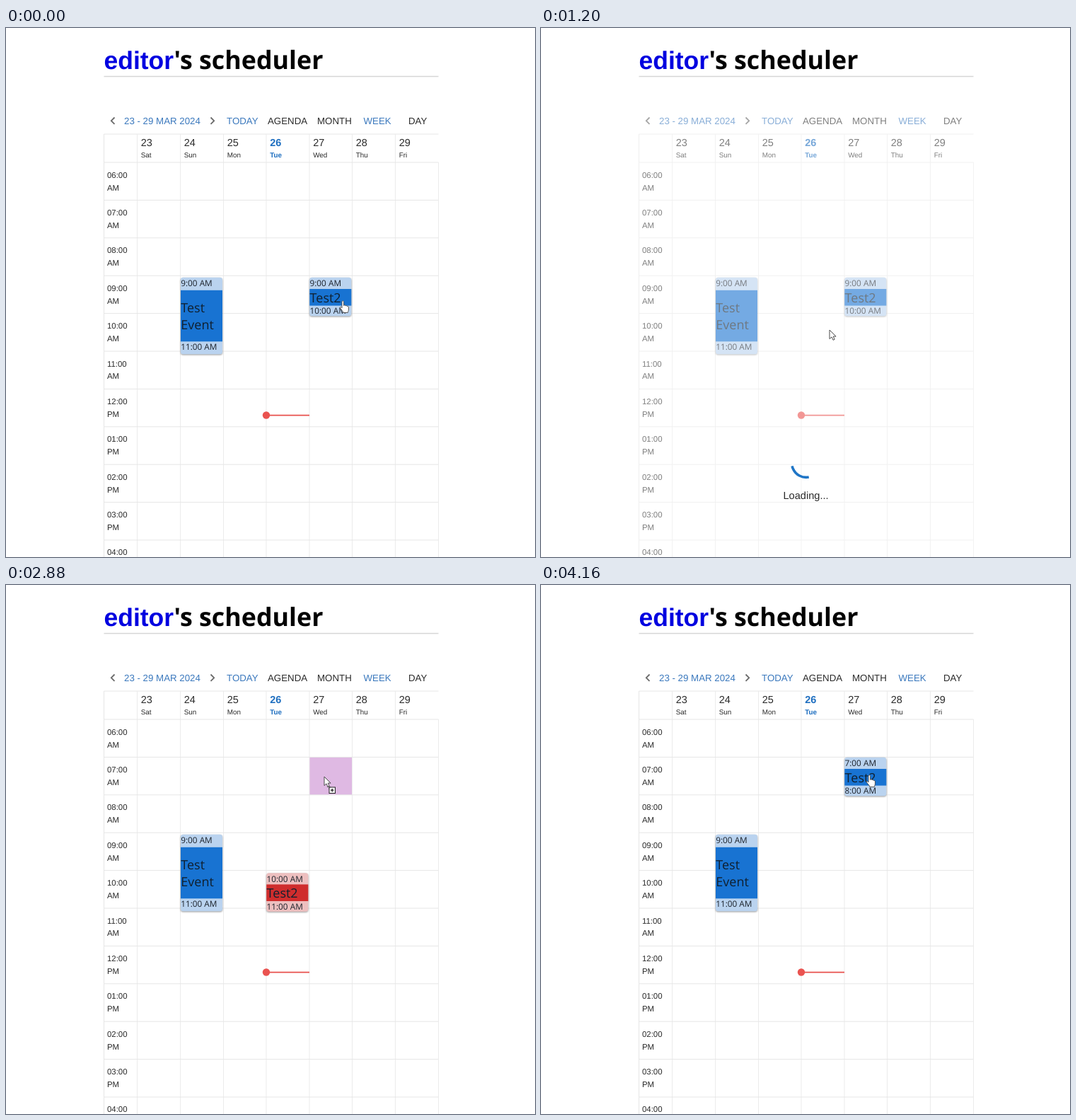
Animation of 748 by 748 pixels, one loop 4.24 s. Source, as an HTML page:

```html
<!DOCTYPE html>
<html lang="en">
<head>
<meta charset="utf-8">
<title>Scheduler</title>
<style>
  html, body { margin: 0; width: 100%; height: 100%; overflow: hidden; background: #fff; }
  svg { display: block; width: 748px; height: 748px; }
  text { font-family: "Liberation Sans", Arial, sans-serif; fill: #2a2a2a; white-space: pre; text-rendering: geometricPrecision; }
  .title { font: bold 35.8px "Open Sans", "Noto Sans", sans-serif; fill: #000; }
  .user { font: bold 35.5px "Liberation Sans", Arial, sans-serif; fill: #0000e0; }
  .tool { font-size: 13.3px; }
  .num { font-size: 14.5px; }
  .day { font-size: 9.9px; }
  .hour { font-size: 11.4px; }
  .blue { fill: #3a78bd; }
  .today { fill: #1f6fc0; font-weight: bold; }
  .time { font: 11.8px "Open Sans", "Noto Sans", sans-serif; fill: #1c222b; }
  .name { font: 18px "Open Sans", "Noto Sans", sans-serif; fill: #10202f; }
  .event { filter: drop-shadow(0 1px 1.2px rgba(0, 0, 0, .4)); }
  .event .edge { fill: #bad3ef; }
  .event .body { fill: #1873d2; }
  .event.drag .edge { fill: #edbfbf; }
  .event.drag .body { fill: #cf2d2d; }
</style>
</head>
<body>
<svg id="stage" viewBox="0 0 748 748"></svg>
<script>
const LOOP = 4240, STEP = 80;
const COLS = [185.5, 246.5, 307.5, 368, 429, 489.5, 550.5, 611.5];
const ROW_TOP = 190, ROW_H = 53.4;
const rowY = i => ROW_TOP + i * ROW_H;

const text = (x, y, cls, s) => `<text x="${x}" y="${y}" class="${cls}">${s}</text>`;
const line = (x1, y1, x2, y2, color = '#e6e6e6', w = 1) =>
  `<path d="M${x1} ${y1}L${x2} ${y2}" stroke="${color}" stroke-width="${w}"/>`;
const rect = (x, y, w, h, attrs) =>
  `<rect x="${x}" y="${y}" width="${w}" height="${h}" ${attrs}/>`;

function toolbar() {
  const items = [[167, '23 - 29 MAR 2024', 1], [312, 'TODAY', 1], [370, 'AGENDA'],
    [440, 'MONTH'], [505.5, 'WEEK', 1], [569, 'DAY']];
  const chevron = d => `<path d="${d}" fill="none" stroke="#6a6a6a" stroke-width="1.8"/>`;
  return chevron('M153.500 126.500l-4.700 4.700l4.700 4.700') + chevron('M289.500 126.500l4.700 4.700l-4.700 4.700') +
    items.map(([x, s, on]) => text(x, 135.7, on ? 'tool blue' : 'tool', s)).join('');
}

function grid() {
  let out = line(138.5, 150, 611.5, 150) + line(138.5, 150, 138.5, 748);
  COLS.forEach((x, i) => out += line(x, i === 7 ? 190 : 150, x, 748, '#ebebeb'));
  for (let i = 0; i < 11; i++) out += line(138.5, rowY(i), 611.5, rowY(i));
  return out;
}

function labels() {
  let out = '';
  ['Sat', 'Sun', 'Mon', 'Tue', 'Wed', 'Thu', 'Fri'].forEach((d, i) => {
    const cls = i === 3 ? ' today' : '', x = COLS[i] + 5.2;
    out += text(x, 167.3, 'num' + cls, 23 + i) + text(x, 183.3, 'day' + cls, d);
  });
  for (let i = 0; i < 11; i++) {
    const h = String((i + 5) % 12 + 1).padStart(2, '0');
    const y = 211.7 + i * 53.37;
    out += text(143, y, 'hour', h + ':00') + text(143, y + 17.9, 'hour', i < 6 ? 'AM' : 'PM');
  }
  return out;
}

// Event card drawn from its own top left corner.
const card = (id, h, top, bottom, names, from, to) =>
  `<g id="${id}" class="event">` + rect(0, 0, 59, h, 'rx="3.5" class="edge"') +
  rect(0, top, 59, bottom - top, 'class="body"') +
  text(.2, 12.6, 'time', from) + text(.2, h - 2.8 - (h > 60 ? 3.6 : 0), 'time', to) +
  names.map(([y, s]) => text(.3, y, 'name', s)).join('') + '</g>';

const HAND = 'M0 1.500C0-.7 3-.7 3 1.500V6.500C4 5.400 5.800 5.700 6 6.900C7 6.100 8.500 6.500 8.600 7.600' +
  'C9.800 7 11 7.700 11 9V12C11 13.800 10 14.500 9.700 16.500H2.300C1.800 14.500-1 12.500-3 9.800C-3.500 8.300-1.800 7.800 0 9.800Z';
const ARROW = 'M0 0V12.600L3 9.900L5.100 14.300L7.200 13.300L5.200 9.100H9.100Z';
const shape = (id, d, sx = 1) =>
  `<path id="${id}" d="${d}" transform="scale(${sx} 1)" fill="#fff" stroke="#4a4a4a" stroke-width="1"/>`;

document.getElementById('stage').innerHTML =
  text(138.5, 58, 'user', 'editor') + text(237.5, 58, 'title', "'s scheduler") +
  line(138.5, 68.5, 611.5, 68.5, '#d6d6d6', 1.6) +
  '<g id="board">' + toolbar() +
  rect(0, 0, 60.5, ROW_H, 'id="cell"') + grid() + labels() +
  card('fixed', 108.5, 18, 90.5, [[49.5, 'Test'], [73.5, 'Event']], '9:00 AM', '11:00 AM') +
  card('moving', 54.5, 16.2, 39.8, [[35.3, 'Test2']], '', '') +
  line(368, 547.6, 429, 547.6, '#e8504d', 1.6) +
  '<circle cx="368" cy="547.500" r="5.200" fill="#ea5350"/></g>' +
  '<g id="loading"><circle id="arc" cx="375" cy="615" r="20.400" fill="none" stroke="#1f75c6" ' +
  'stroke-width="3.600" pathLength="126.900"/>' + text(342.5, 666, '', 'Loading...') + '</g>' +
  '<g id="cursor">' + shape('hand', HAND, .86) + shape('arrow', ARROW) +
  '<g id="badge" stroke="#222" fill="none"><path d="M4 14.500H9M6 17H10" stroke="#666"/>' +
  rect(7, 15, 8.5, 8.5, 'fill="#fff"') + '<path d="M9 19.200h4.500M11.250 17v4.500" stroke-width="1.300"/></g></g>';

const $ = id => document.getElementById(id);
$('fixed').setAttribute('transform', 'translate(247 352.8)');
$('loading').querySelector('text').style.fontSize = '14.6px';

// time, x, y of the pointer tip
const PATH = [[0, 475, 386], [160, 475, 386], [400, 415, 420], [960, 415, 420], [1120, 408, 427],
  [1840, 408, 427], [2000, 410, 432], [2320, 410, 432], [2720, 450, 271], [4000, 450, 271], [4160, 463, 269]];
// start, x, y, first and last hour
const PLACES = [[0, 429.3, 352.8, '9:00 AM', '10:00 AM'], [1840, 368.3, 407.2, '10:00 AM', '11:00 AM'],
  [4080, 429.3, 243.8, '7:00 AM', '8:00 AM']];
const DRAGS = [[240, 960, 1120], [2400, 3280, 3440]];   // grab, drop, release
const LOADS = [[940, 1840], [3280, 4080]];
// start, end, column, row of the marked drop slot
const SLOTS = [[320, 1120, 3, 4], [2480, 2560, 3, 3], [2560, 2640, 4, 2], [2640, 3440, 4, 1]];
const HOVER = [1840, 2320, 4, 3];

const within = (t, list) => list.find(([a, b]) => t >= a && t < b);
const show = (id, on) => $(id).style.display = on ? '' : 'none';
const ease = p => (1 - Math.cos(Math.PI * p)) / 2;

function pointer(t) {
  const i = Math.max(1, PATH.findIndex(p => p[0] >= t));
  const [t0, x0, y0] = PATH[i - 1], [t1, x1, y1] = PATH[i];
  const k = ease(Math.min(1, (t - t0) / (t1 - t0)));
  return [x0 + (x1 - x0) * k, y0 + (y1 - y0) * k];
}

function spin(t) {
  const p = t / 1400;
  const a = ease(Math.min(1, p * 2)), b = ease(Math.max(0, p * 2 - 1));
  $('arc').setAttribute('transform', `rotate(${p * 360} 375 615)`);
  $('arc').setAttribute('stroke-dasharray', `${1 + 99 * a} 200`);
  $('arc').setAttribute('stroke-dashoffset', -15 * a - 110 * b);
}

function markCell(t) {
  const slot = within(t, SLOTS), hover = within(t, [HOVER]), c = slot || hover;
  show('cell', c);
  if (!c) return;
  const cell = $('cell');
  cell.setAttribute('x', COLS[c[2]]);
  cell.setAttribute('y', rowY(c[3]));
  cell.setAttribute('fill', slot ? '#dfb9e3' : '#f8f9fb');
  cell.setAttribute('opacity', slot ? Math.min(1, .35 + (t - c[0]) / 340) : 1);
}

function draw(t) {
  const load = within(t, LOADS), drag = DRAGS.find(d => t >= d[0] && t < d[2]);
  const dragging = drag && t < drag[1];
  const place = PLACES.filter(p => p[0] <= t).pop();
  const moving = $('moving'), [from, to] = moving.querySelectorAll('.time');
  moving.setAttribute('transform', `translate(${place[1]} ${place[2]})`);
  moving.classList.toggle('drag', !!drag);
  from.textContent = place[3];
  to.textContent = place[4];

  markCell(t);
  $('board').setAttribute('opacity', load ? .6 : 1);
  show('loading', load);
  if (load) spin(t - load[0]);

  const hand = !load && !drag;
  show('hand', hand);
  show('arrow', !hand);
  show('badge', dragging);
  $('cursor').setAttribute('transform', `translate(${pointer(t)})`);
}

const begin = performance.now();
function tick() {
  const t = (performance.now() - begin) % LOOP;
  draw(Math.floor(t / STEP) * STEP);
  requestAnimationFrame(tick);
}
tick();
</script>
</body>
</html>
```
